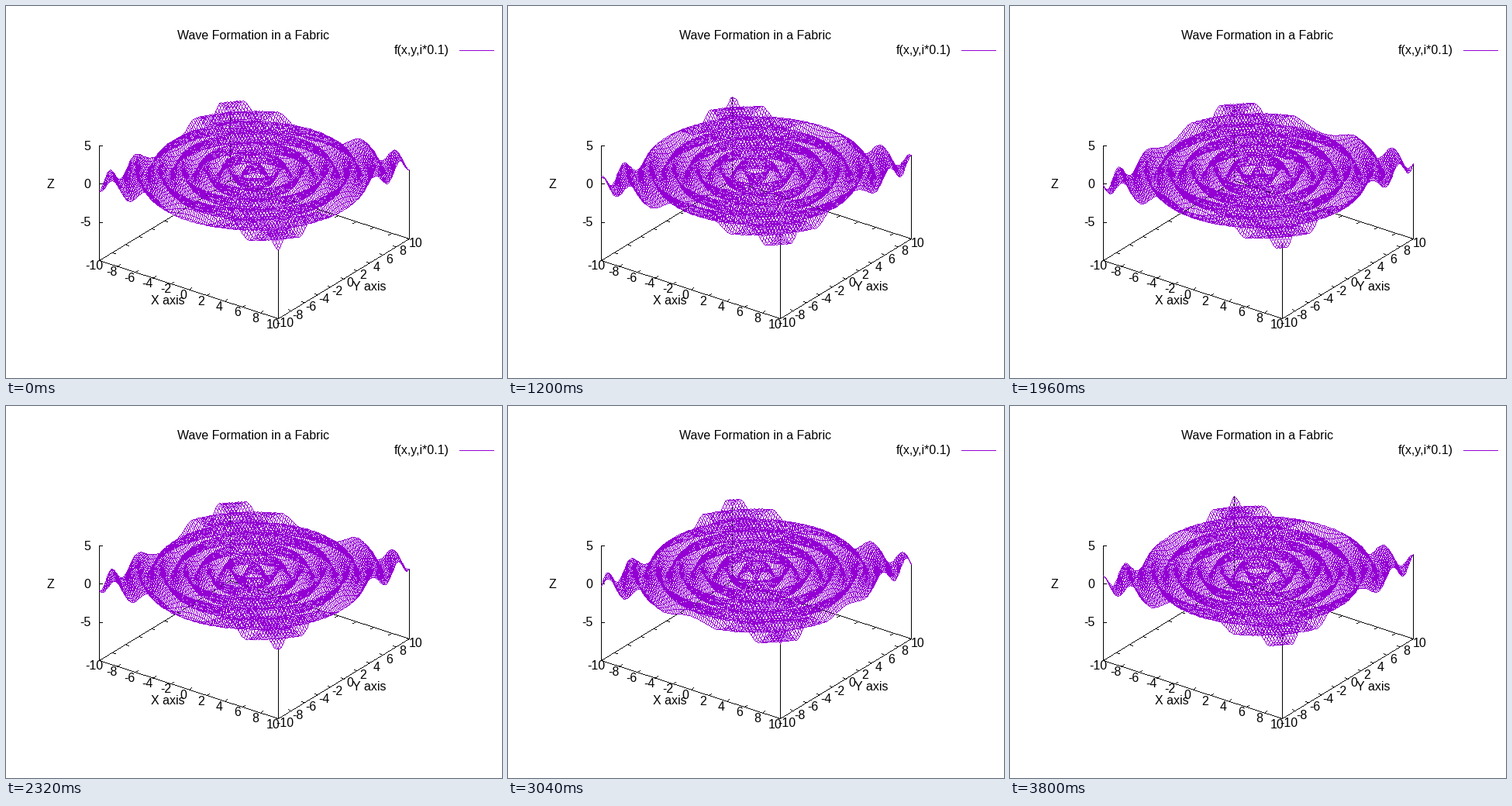
A matplotlib script for the animation above (3.84 s loop, 640 by 480 pixels).

```python
import numpy as np
import matplotlib.pyplot as plt
from matplotlib.animation import FuncAnimation

W, H, DPI = 640, 480, 100
FRAMES, INTERVAL = 96, 40
FONT_SIZE = 16 * 72 / DPI
WHITE, BLACK, PURPLE = range(3)
PALETTE = np.array([[255, 255, 255], [0, 0, 0], [148, 0, 211]], np.uint8)

# Floor corners on the stage; one unit of height is Z_UNIT pixels
LEFT, FRONT, RIGHT = np.array([[120, 328], [351, 403], [520, 300]], float)
X_EDGE, Y_EDGE = FRONT - LEFT, RIGHT - FRONT
BACK = LEFT + Y_EDGE
Z_UNIT = 148 / 15
FLOOR = -10

plt.rcParams["font.family"] = "Liberation Sans"
fig = plt.figure(figsize=(W / DPI, H / DPI), dpi=DPI, facecolor="white")
ax = fig.add_axes([0, 0, 1, 1])
ax.axis("off")


def project(x, y, z):
    u, v = (x + 10) / 20, (y + 10) / 20
    px = LEFT[0] + u * X_EDGE[0] + v * Y_EDGE[0]
    py = LEFT[1] + u * X_EDGE[1] + v * Y_EDGE[1] - (z - FLOOR) * Z_UNIT
    return np.stack([px, py], axis=-1)


def to_pixel(points):
    return np.floor(np.asarray(points) + 0.5).astype(int)


def draw_lines(canvas, starts, ends, color):
    """Draw hard one-pixel lines between matching start and end points."""
    p = to_pixel(starts).reshape(-1, 2)
    d = to_pixel(ends).reshape(-1, 2) - p
    steps = np.maximum(np.abs(d).max(axis=1, keepdims=True), 1)
    for k in range(steps.max() + 1):
        x, y = to_pixel(p + d * np.minimum(k / steps, 1)).T
        canvas[y, x] = color


def label(x, y, s, ha="center"):
    ax.text(x, y, s, ha=ha, va="baseline", fontsize=FONT_SIZE, color="black")


def unit(v):
    return v / np.hypot(*v)


# Floor, height axis, tick marks and their labels
box = [(LEFT, FRONT), (FRONT, RIGHT), (RIGHT, BACK), (BACK, LEFT),
       (LEFT, LEFT - [0, 148])]
x_in, y_in = 4 * unit(X_EDGE), 4 * unit(Y_EDGE)
for k, value in enumerate(range(-10, 11, 2)):
    a = LEFT + X_EDGE * k / 10
    b = FRONT + Y_EDGE * k / 10
    box += [(a, a + y_in), (a + Y_EDGE, a + Y_EDGE - y_in),
            (b, b - x_in), (b - X_EDGE, b - X_EDGE + x_in)]
    label(a[0] - 6.5, a[1] + 12.5, str(value))
    label(b[0] + 8.5, b[1] + 11, str(value))
for value in (-5, 0, 5):
    p = project(-10, -10, value)
    box.append((p, p + [4, 0]))
    label(109, p[1] + 5.5, str(value), "right")

label(319, 43, "Wave Formation in a Fabric")
label(571.5, 62, "f(x,y,i*0.1)", "right")
label(208.5, 385, "X axis")
label(468.5, 367, "Y axis")
label(57, 235, "Z")

backdrop = np.full((H, W), WHITE)
draw_lines(backdrop, *zip(*box), BLACK)
draw_lines(backdrop, [(585, 57)], [(629, 57)], PURPLE)

grid = np.linspace(-10, 10, 100)
X, Y = np.meshgrid(grid, grid)
R = np.hypot(X, Y)
image = ax.imshow(PALETTE[backdrop], extent=(0, W, H, 0), aspect="auto",
                  interpolation="nearest")
ax.set(xlim=(0, W), ylim=(H, 0))


def update(i):
    points = project(X, Y, np.sin(3 * R - i * 0.1))
    canvas = backdrop.copy()
    corners = [points[0, -1], points[-1, -1], points[-1, 0]]
    draw_lines(canvas, [FRONT, RIGHT, BACK], corners, BLACK)
    draw_lines(canvas, points[:, :-1], points[:, 1:], PURPLE)
    draw_lines(canvas, points[:-1], points[1:], PURPLE)
    image.set_data(PALETTE[canvas])
    return [image]


anim = FuncAnimation(fig, update, frames=FRAMES, interval=INTERVAL,
                     repeat=True, repeat_delay=0, blit=False)
plt.show()
```
